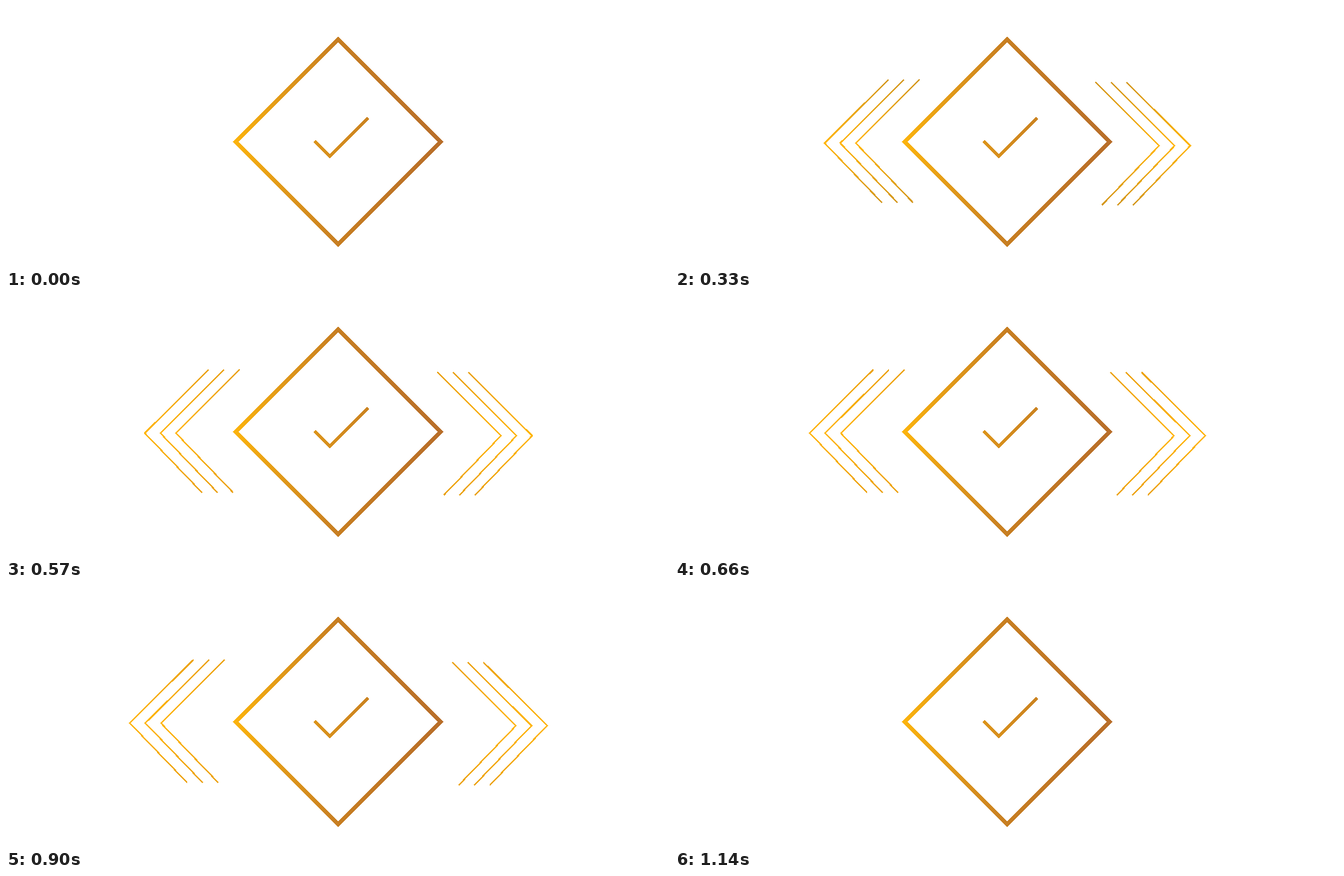
An HTML page that plays this animation: 1032x408 px, repeating every 1.35 s.

```html
<!DOCTYPE html>
<html lang="en">
<head>
<meta charset="utf-8">
<title>Diamond check</title>
<style>
html, body { margin: 0; width: 100%; height: 100%; overflow: hidden; background: #fff; }
svg { display: block; width: 1032px; height: 408px; }
path { fill: none; shape-rendering: crispEdges; }
</style>
</head>
<body>
<svg viewBox="0 0 1032 408">
  <defs>
    <linearGradient id="frame" gradientUnits="userSpaceOnUse" x1="354" y1="0" x2="680" y2="0">
      <stop offset="0" stop-color="#fcb40c"/>
      <stop offset=".25" stop-color="#df971a"/>
      <stop offset=".5" stop-color="#c77e22"/>
      <stop offset="1" stop-color="#b86e2a"/>
    </linearGradient>
    <linearGradient id="tick" gradientUnits="userSpaceOnUse" x1="480" y1="0" x2="564" y2="0">
      <stop offset="0" stop-color="#dc941b"/>
      <stop offset="1" stop-color="#cb8321"/>
    </linearGradient>
    <linearGradient id="arrow" gradientUnits="userSpaceOnUse" x1="0" y1="-99" x2="0" y2="93">
      <stop class="end" offset="0"/>
      <stop offset=".52" stop-color="#ffb60a"/>
      <stop class="end" offset="1"/>
    </linearGradient>
  </defs>
  <path d="M517 52 L676.5 211.5 L517 371 L357.5 211.5 Z" stroke="url(#frame)" stroke-width="6"/>
  <path d="M482 212 L504 234 L562 176" stroke="url(#tick)" stroke-width="5" stroke-linecap="round"/>
  <g id="arrows" stroke="url(#arrow)" stroke-linecap="round"></g>
</svg>
<script>
const LOOP = 1350, STEP = 30, START = 240, END = 1140;
const GAP = 24.2, SPEED = 0.0705, MIRROR = 1035;
const group = document.getElementById('arrows');
const ends = document.querySelectorAll('.end');

const arrows = [];
for (const side of [1, -1]) {
  for (let i = 0; i < 3; i++) {
    const el = document.createElementNS('http://www.w3.org/2000/svg', 'path');
    el.setAttribute('d', 'M98.5 -98.2 L0 0 L88.5 92');
    group.append(el);
    arrows.push({ el, side, i });
  }
}

// Linear interpolation through [time, value] pairs
function ramp(t, keys) {
  for (let k = 1; k < keys.length; k++) {
    const [t0, a] = keys[k - 1], [t1, b] = keys[k];
    if (t <= t1) return a + (b - a) * Math.max(0, (t - t0) / (t1 - t0));
  }
  return keys[keys.length - 1][1];
}

const widths = [[240, 1.4], [330, 2.3], [420, 2.7], [570, 2.2], [990, 2.2], [1110, 1.4]];
const glow = [[240, 0], [420, 0.65], [600, 1], [930, 1], [1110, 0.4]];

function draw(time) {
  const t = Math.floor((time % LOOP) / STEP) * STEP;
  const on = t >= START && t < END;
  group.style.display = on ? '' : 'none';
  if (on) {
    const tip = 239.3 - SPEED * (t - START);
    for (const { el, side, i } of arrows) {
      const x = tip + i * GAP;
      el.setAttribute('transform', side > 0
        ? `translate(${x} 213.5)`
        : `translate(${MIRROR - x} 217.5) scale(-1 1)`);
    }
    group.setAttribute('stroke-width', ramp(t, widths));
    const g = ramp(t, glow);
    const color = `rgb(${200 + 36 * g}, ${148 + 15 * g}, ${44 - 28 * g})`;
    ends.forEach(stop => stop.setAttribute('stop-color', color));
  }
}

let origin;
function tick(now) {
  origin ??= now;
  draw(now - origin);
  requestAnimationFrame(tick);
}
draw(0);
requestAnimationFrame(tick);
</script>
</body>
</html>
```
